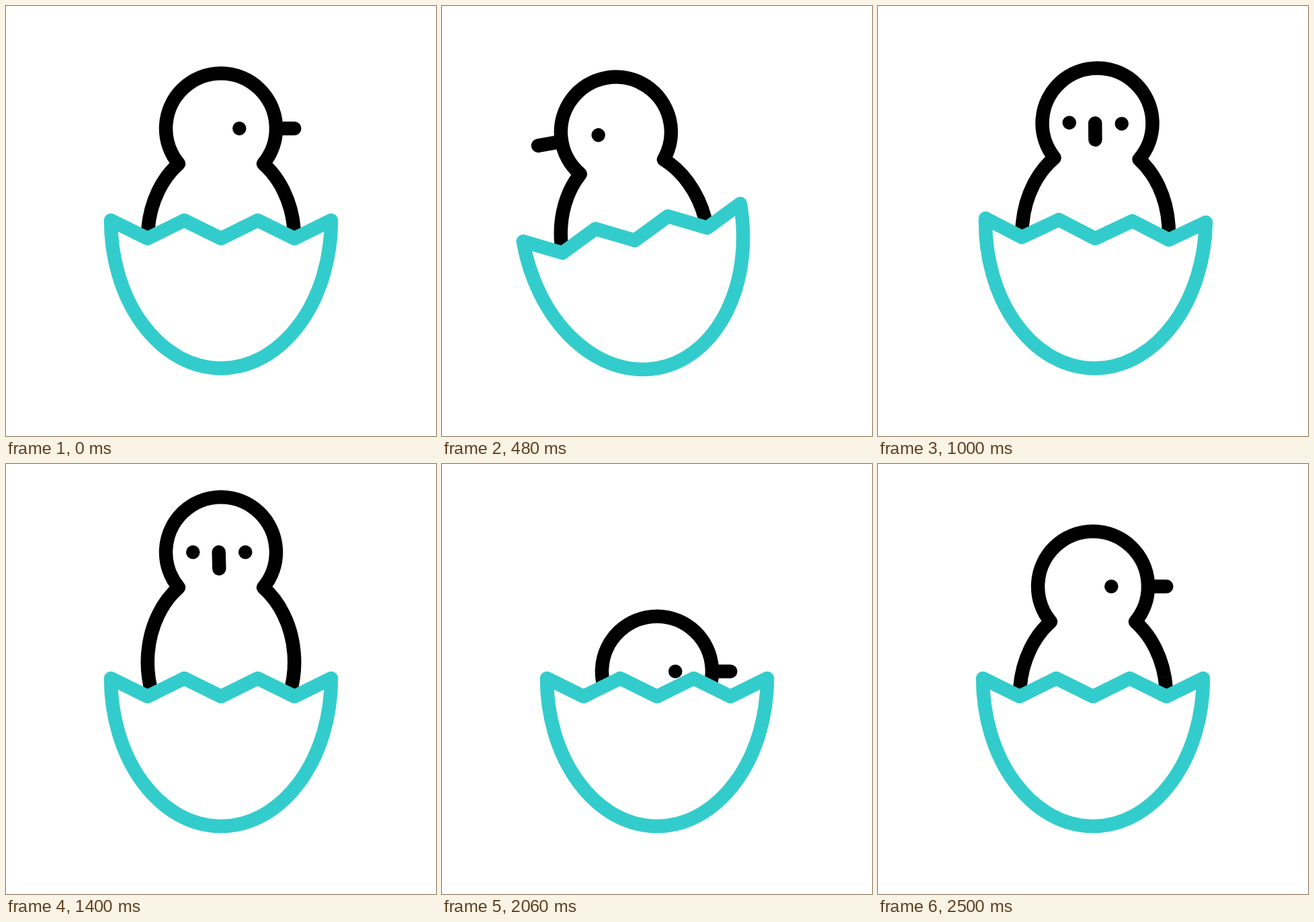
Write an HTML page that moves like this. It is 640 px wide and 640 px high and loops after 3600 ms.

```html
<!DOCTYPE html>
<html lang="en">
<head>
<meta charset="utf-8">
<title>Hatching chick</title>
<style>
  html, body { margin: 0; width: 100%; height: 100%; overflow: hidden; background: #fff; }
  svg { display: block; width: 100vw; height: 100vh; }
  .ink { fill: none; stroke: #000; }
  .teal { fill: none; stroke: #3cc; }
  .ink, .teal { stroke-width: 20.5; stroke-linecap: round; stroke-linejoin: round; }
  .solid { fill: #fff; }
</style>
</head>
<body>
<svg viewBox="0 0 640 640">
  <defs>
    <clipPath id="above">
      <path d="M-200 -300V319H156L210.7 346L265.3 319L320 346L374.7 319L429.3 346L484 319H840V-300Z"/>
    </clipPath>
    <clipPath id="face"><circle cx="320" cy="182.3" r="82"/></clipPath>
  </defs>
  <g id="all">
    <g clip-path="url(#above)">
      <g id="streaks"></g>
      <g id="chick">
        <path class="ink solid" d="M241.1 440A109.3 136.1 0 0 1 257 234.8A82 82 0 1 1 383 234.8A109.3 136.1 0 0 1 398.9 440"/>
        <g clip-path="url(#face)">
          <circle id="eyeL" cy="182.3" r="10.25"/>
          <circle id="eyeR" cy="182.3" r="10.25"/>
        </g>
        <path id="beak" class="ink"/>
      </g>
    </g>
    <path class="teal solid" d="M156 319L210.7 346L265.3 319L320 346L374.7 319L429.3 346L484 319A164 220.3 0 0 1 156 319Z"/>
  </g>
</svg>
<script>
const LOOP = 3600;
const $ = id => document.getElementById(id);
const clamp = x => Math.min(1, Math.max(0, x));
const mix = (a, b, k) => a + (b - a) * k;
const smooth = x => x * x * (3 - 2 * x);

// Tracks of [time, value], eased between keys.
const TILT = [[0, 0], [460, -10], [810, 5], [1160, -2], [1390, 0]];
const LIFT = [[820, 0], [1660, -66], [1740, 255], [1880, 255], [2240, 0]];
const TURN = [[0, 1], [460, -1], [810, 0], [1780, 0], [1800, 1]];

// Head poses: eye shift, beak base x, beak tip x, beak tip y.
const RIGHT = [66.3, 82, 109.3, 0];
const FRONT = [-2.75, -3.3, -2.7, 24.5];
const LEFT = [-66.3, -90, -118.9, 0];

// Falling streaks: x, top, length.
const STREAKS = [[250.8, 47.5, 249], [331.3, 111, 234], [414.7, 52.2, 186]];
const lines = STREAKS.map(() => {
  const p = document.createElementNS('http://www.w3.org/2000/svg', 'path');
  p.setAttribute('class', 'teal');
  return $('streaks').appendChild(p);
});

function at(track, t) {
  let [t0, v0] = track[0];
  for (const [t1, v1] of track) {
    if (t < t1) return t1 === t0 || t < t0 ? v0 : mix(v0, v1, smooth((t - t0) / (t1 - t0)));
    [t0, v0] = [t1, v1];
  }
  return v0;
}

function drawFace(turn) {
  const side = turn > 0 ? RIGHT : LEFT;
  const [shift, base, tipX, tipY] = FRONT.map((v, i) => mix(v, side[i], Math.abs(turn)));
  $('eyeL').setAttribute('cx', 281 + shift);
  $('eyeR').setAttribute('cx', 359 + shift);
  $('beak').setAttribute('d', `M${320 + base} 182.3L${320 + tipX} ${182.3 + tipY}`);
}

function drawStreaks(t) {
  const head = clamp((t - 1660) / 140);
  const tail = clamp((t - 1718) / 140);
  lines.forEach((line, i) => {
    const [x, top, len] = STREAKS[i];
    line.setAttribute('d', `M${x} ${top + len * tail}V${top + len * head}`);
    line.style.display = head > tail ? '' : 'none';
  });
}

function draw(t) {
  $('all').setAttribute('transform', `rotate(${at(TILT, t)} 320 539.5)`);
  $('chick').setAttribute('transform', `translate(0 ${at(LIFT, t)})`);
  drawFace(at(TURN, t));
  drawStreaks(t);
}

const start = performance.now();
function tick() {
  draw((performance.now() - start) % LOOP);
  requestAnimationFrame(tick);
}
tick();
</script>
</body>
</html>
```
